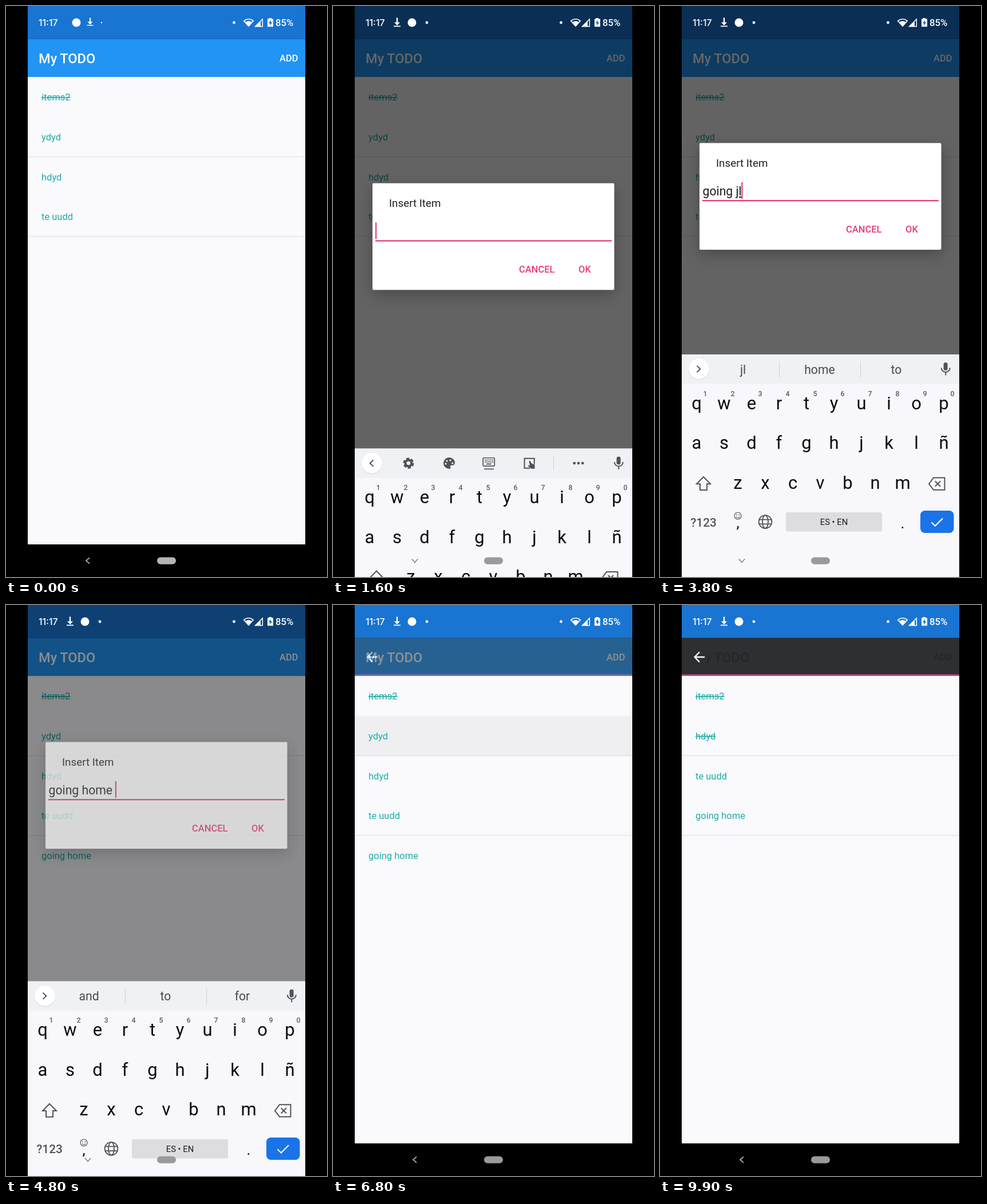
Write an HTML page that moves like this. It is 561x998 px and loops after 10000 ms.

```html
<!DOCTYPE html>
<html lang="en">
<head>
<meta charset="utf-8">
<title>Todo list</title>
<style>
  html, body { margin: 0; width: 100%; height: 100%; overflow: hidden; background: #000; }
  svg { display: block; width: 100vw; height: 100vh; }
  text { font-family: Roboto, "Noto Sans", sans-serif; white-space: pre; }
  .med { font-weight: 500; }
  .mid { text-anchor: middle; }
  .line { fill: none; stroke: #505357; stroke-width: 2; }
  .ink { fill: #505357; }
  .item { font-size: 16.5px; fill: #1eaca7; }
  .done { text-decoration: line-through; }
  .accent { fill: #e63c7a; }
  .key { font-size: 31px; fill: #0b0b0c; }
  .hint { font-size: 12.5px; fill: #5c5d61; }
  .word { font-size: 21.2px; fill: #484b4f; }
  #card { filter: drop-shadow(0 8px 12px rgba(0, 0, 0, .26)); }
  #composing { text-decoration: underline 1px; text-decoration-skip-ink: none; }
</style>
</head>
<body>
<svg id="stage" viewBox="0 0 561 998" xmlns="http://www.w3.org/2000/svg"></svg>
<script>
const DURATION = 10000, STEP = 100;
const CHAR_TIMES = [2600, 2700, 2900, 3000, 3100, 3300, 3500, 3700];
const PICK = 4200, SUBMIT = 4800, STRIKE = 7800, REMOVE = 9800;
const PRESSES = [{ down: 6200, act: STRIKE }, { down: 8700, act: REMOVE }];
const ROW_H = 69.75;

const rect = (x, y, w, h, fill, more = '') =>
  `<rect x="${x}" y="${y}" width="${w}" height="${h}" fill="${fill}" ${more}/>`;
const text = (x, y, str, cls = '', more = '') =>
  `<text x="${x}" y="${y}" class="${cls}" ${more}>${str}</text>`;
const circle = (x, y, r, more = '') => `<circle cx="${x}" cy="${y}" r="${r}" ${more}/>`;
const line = (d, more = '') => `<path d="${d}" class="line" ${more}/>`;

function appBar() {
  return rect(38, 0, 485, 57.5, '#1974d2') + rect(38, 57.5, 485, 66.5, '#2194f5') +
    text(57, 99.5, 'My TODO', 'med', 'font-size="23.6" fill="#fff"') +
    text(478, 97.3, 'ADD', 'med', 'font-size="16.5" fill="#fff"') +
    circle(494, 91, 0, 'id="addRipple" fill="#fff" clip-path="url(#barClip)"');
}

function actionBar() {
  return `<g id="actions">${rect(38, 57.5, 485, 64, '#2e2f31')}
    <g fill="#252628" clip-path="url(#ghostClip)">
      ${text(57, 99.5, 'My TODO', 'med', 'font-size="23.6"')}
      ${text(478, 97.3, 'ADD', 'med', 'font-size="16.5"')}</g>
    ${rect(38, 121.4, 485, 2.6, '#e4356f')}
    <path d="M78 91H61M69 82.3L60.6 91L69 99.7" fill="none" stroke="#fff" stroke-width="2.3"/></g>`;
}

function statusIcons() {
  return `<g fill="#fff">
    <text x="57" y="35" class="med" style="font-family:Inter,Roboto,sans-serif" font-size="15.8">11:17</text>
    <path id="download" d="M-1.2 -8H1.2V0H5L0 5.5L-5 0H-1.2ZM-6 6H6V7.8H-6Z"/>
    ${circle(138, 29, 7.5, 'id="badge"')}${circle(164, 29, 2.3, 'id="more"')}
    ${circle(398.5, 29, 2.4)}
    <path d="M415.8 26Q424 19.5 432.2 26L424 35.3Z" fill="none" stroke="#fff" stroke-width="1.6"/>
    <path d="M418.5 28Q424 24.5 429.5 28L424 35Z"/>
    <path d="M435.5 35.8L448.3 23V35.8Z" fill="none" stroke="#fff" stroke-width="1.5"/>
    <path d="M435.5 36L445 26.5V36Z"/>
    <path d="M459.5 21H464V22.6H467V36.3H457V22.6H459.5Z"/>
    <path d="M462.8 24.5L459 30.3H461.4V34.5L465.2 28.5H462.8Z" fill="#1768bd"/>
    ${text(471, 35, '85%', 'med', 'font-size="16.8"')}</g>`;
}

function dialog() {
  return `<g id="dialog">
    ${rect(69, 406, 422.5, 186.5, '#fff', 'rx="2" id="card"')}
    ${text(98, 447.5, 'Insert Item', '', 'font-size="18.8" fill="#1f1f21"')}
    <text id="field" x="74.5" y="497.5" font-size="21.2" fill="#1f1f21"><tspan id="before"></tspan><tspan id="composing"></tspan></text>
    ${rect(142, 474.5, 2.2, 29, '#e63c7a', 'id="caret"')}
    ${rect(74, 506, 413, 1, '#77757a', 'id="underline"')}
    ${text(325, 562.7, 'CANCEL', 'med accent', 'font-size="16.5"')}
    ${text(429, 562.7, 'OK', 'med accent', 'font-size="16.5"')}</g>`;
}

function toolIcons() {
  const dots = [[-4, -4], [2, -5], [6, 0], [-6, 1]]
    .map(([x, y]) => circle(203 + x, 634.5 + y, 1.6, 'fill="#eff1f4"')).join('');
  let keys = '';
  for (let i = 0; i < 10; i++)
    keys += rect(265.2 + (i % 5) * 3.2, 628 + Math.floor(i / 5) * 3.4, 1.9, 1.9, '#505357');
  return `<g id="tools">
    ${circle(132, 634.5, 5.4, 'class="line" style="stroke-width:4.2"')}
    ${circle(132, 634.5, 8.2, 'class="line" stroke-dasharray="5.4 3.19" style="stroke-width:2.8"')}
    <path class="ink" d="M203 624.5a10 10 0 1 0 0 20q2.6 0 2.3-2.6q-1.2-3.6 2-3.8h2.5q3.2-.6 3.2-4.6a10 9.4 0 0 0-10-9Z"/>${dots}
    ${line('M263.5 625.2H281Q282.3 625.2 282.3 626.5V638.3Q282.3 639.6 281 639.6H263.5Q262.2 639.6 262.2 638.3V626.5Q262.2 625.2 263.5 625.2Z', 'style="stroke-width:1.7"')}
    ${keys}${rect(268, 635, 8.5, 1.9, '#505357')}${rect(264, 644, 17, 1.7, '#505357')}
    ${line('M351.8 636V626.2H334.6V643.2H344')}
    <path class="ink" d="M342.5 631L344.5 630.5L347 635L352.6 637V644.3H346L340.5 639L341.5 638L344 638.6Z"/>
    ${rect(385, 622, 1, 25, '#cdd0d4')}
    ${[421.8, 429, 436.2].map(x => circle(x, 634.5, 2.4, 'class="ink"')).join('')}</g>`;
}

function letterKeys() {
  const rows = [['qwertyuiop', 64, 704.5], ['asdfghjklñ', 64, 774], ['zxcvbnm', 136, 843.5]];
  return rows.map(([chars, x, y]) => [...chars].map((c, i) =>
    text(x + i * 48, y, c, 'key mid')).join('')).join('') +
    [...'1234567890'].map((c, i) => text(79 + i * 48, 681.6, c, 'hint mid med')).join('');
}

function keyboard() {
  const words = [145, 279, 413].map((x, i) => text(x, 642.5, '', 'word mid', `id="word${i}"`)).join('');
  return `<g id="keyboard">
    ${rect(38, 609, 485, 390, '#f8f7fc')}${rect(38, 609, 485, 51, '#eff1f4')}
    ${circle(68, 635.3, 18, 'fill="#d3d6da"')}${circle(68, 634.5, 17.8, 'fill="#fff"')}
    ${line('M3 -5.6L-2.8 0L3 5.6', 'id="toggle"')}
    ${toolIcons()}
    <g id="words">${words}${rect(208, 621, 1, 28, '#cdd0d4')}${rect(350, 621, 1, 28, '#cdd0d4')}</g>
    ${rect(495.6, 623, 7, 14, '#505357', 'rx="3.5"')}
    ${line('M491.8 632.5a7.5 7.5 0 0 0 15 0M499.3 640V645.5')}
    ${letterKeys()}
    ${line('M76 823L88 835.3H82V846H70V835.3H64Z')}
    ${line('M478 824.5H497.5V845.8H478L470 835.2ZM480.8 830.5L490 839.8M490 830.5L480.8 839.8')}
    ${text(76, 909.6, '?123', 'mid med ink', 'font-size="20.8"')}
    ${circle(136, 891, 6, 'class="line" style="stroke-width:1.2"')}
    ${circle(133.9, 889.4, .9, 'class="ink"')}${circle(138.1, 889.4, .9, 'class="ink"')}
    ${line('M132.8 892.6Q136 896.3 139.2 892.6', 'style="stroke-width:1.1"')}
    ${text(136, 912, ',', 'mid', 'font-size="26" fill="#0b0b0c"')}
    <g class="line" style="stroke-width:1.8">${circle(184, 901.5, 11.4)}
      <ellipse cx="184" cy="901.5" rx="5" ry="11.4"/><path d="M173.3 897.6H194.7M173.3 905.4H194.7"/></g>
    ${rect(220, 885, 168, 33.5, '#dddce0', 'rx="3"')}
    ${text(304, 907.3, 'ES • EN', 'mid', 'font-size="14.8" fill="#1c1c1e"')}
    ${text(424, 912.5, '.', 'mid', 'font-size="26" fill="#0b0b0c"')}
    ${rect(455, 882, 58.5, 39, '#1a73e8', 'rx="8"')}
    <path d="M474.5 902.5L480.8 908.7L494 895.5" fill="none" stroke="#fff" stroke-width="2.2"/></g>`;
}

document.getElementById('stage').innerHTML = `
  <defs>
    <clipPath id="phone">${rect(38, 0, 485, 998, '#000')}</clipPath>
    <clipPath id="barClip">${rect(38, 57.5, 485, 66.5, '#000')}</clipPath>
    <clipPath id="ghostClip">${rect(82, 57, 441, 67, '#000')}</clipPath>
    <clipPath id="rowClip">${rect(38, 194, 485, 69, '#000')}</clipPath>
  </defs>
  ${rect(0, 0, 561, 998, '#000')}
  <g clip-path="url(#phone)">
    ${rect(38, 124, 485, 817, '#faf9fc')}
    ${rect(38, 262.8, 485, 1.2, '#e1e0e3')}${rect(38, 402.2, 485, 1.2, '#e1e0e3')}
    ${circle(280, 229, 0, 'id="rowRipple" fill="#000" clip-path="url(#rowClip)"')}
    <g id="list"></g>
    ${appBar()}${actionBar()}
    ${rect(38, 0, 485, 941, '#000', 'id="dim"')}
    ${statusIcons()}${dialog()}${keyboard()}
    <path id="back" d="M3 -5.2L-3 0L3 5.2" fill="none" stroke-width="1.7"/>
    ${rect(264, 963.5, 33, 12.3, '#999', 'rx="6.1" id="pill"')}
  </g>`;

const ui = {};
document.querySelectorAll('[id]').forEach(e => ui[e.id] = e);
const set = (e, attrs) => { for (const k in attrs) e.setAttribute(k, attrs[k]); };
const ramp = (t, a, b) => Math.min(1, Math.max(0, (t - a) / (b - a)));
const easeOut = p => 1 - (1 - p) ** 3;
const show = (e, on) => set(e, { visibility: on ? 'inherit' : 'hidden' });

function suggestions(typed) {
  if (typed.length > 8) return ['and', 'to', 'for'];
  const word = typed.split(' ').pop();
  if (!word) return ['to', 'home', 'out'];
  if (word === 'j') return ['j', 'just', 'to'];
  return word === 'jl' ? ['jl', 'home', 'to'] : [word, 'going', 'good'];
}

function drawList(t) {
  const names = ['items2', 'ydyd', 'hdyd', 'te uudd'];
  if (t >= SUBMIT) names.push('going home');
  if (t >= REMOVE) names.splice(1, 1);
  // the second row keeps its strike after a removal
  ui.list.innerHTML = names.map((name, i) => {
    const done = i === 0 || (i === 1 && t >= STRIKE);
    return text(62, 165 + i * ROW_H, name, 'item' + (done ? ' done' : ''));
  }).join('');
}

function drawDialog(t) {
  const rise = easeOut(ramp(t, 1500, 1900));
  const alpha = ramp(t, 300, 600) * (1 - ramp(t, 4700, 5000));
  const focused = t >= 1500;
  const typed = t >= PICK ? 'going home ' : 'going jl'.slice(0, CHAR_TIMES.filter(c => c <= t).length);
  const start = t >= PICK ? typed.length : typed.lastIndexOf(' ') + 1;
  set(ui.dim, { opacity: .6 * ramp(t, 300, 600) * (1 - ramp(t, 4700, 5100)) });
  set(ui.dialog, { opacity: alpha, transform: `translate(0 ${-166.5 * rise})` });
  show(ui.dialog, alpha > 0);
  set(ui.underline, focused ? { y: 505.6, height: 2.2, fill: '#e0396f' } : { y: 506, height: 1, fill: '#77757a' });
  ui.before.textContent = typed.slice(0, start);
  ui.composing.textContent = typed.slice(start);
  set(ui.caret, { x: 74 + (typed ? ui.field.getComputedTextLength() : 0) });
  show(ui.caret, focused && (t < 2100 || t >= 2600) && alpha > 0);

  const up = rise * (1 - ramp(t, 4700, 5100) ** 1.5);
  set(ui.keyboard, { transform: `translate(0 ${390 * (1 - up)})` });
  show(ui.keyboard, up > 0);
  show(ui.tools, !typed && up > 0);
  show(ui.words, !!typed && up > 0);
  set(ui.toggle, { transform: `translate(67.5 634.5) scale(${typed ? -1 : 1} 1)` });
  if (typed) suggestions(typed).forEach((w, i) => ui['word' + i].textContent = w);
  set(ui.back, {
    transform: `translate(143 969.5) rotate(${up > .5 ? -90 : 0})`,
    stroke: up > .5 ? '#88878b' : '#b4b4b4'
  });
}

function drawPresses(t) {
  let bar = 0, r = 0, tint = 0;
  for (const { down, act } of PRESSES) {
    if (t <= down || t >= act + 400) continue;
    bar = ramp(t, down + 400, down + 800) * (1 - ramp(t, act + 100, act + 400));
    r = 300 * ramp(t, down, down + 300);
    tint = .09 * (1 - ramp(t, down + 400, down + 800));
  }
  set(ui.actions, { opacity: bar });
  set(ui.rowRipple, { r, opacity: tint });
  set(ui.addRipple, { r: 40 * ramp(t, 0, 300), opacity: .22 * (1 - ramp(t, 300, 600)) });
}

function drawStatus(t) {
  const early = t < 200;
  set(ui.download, { transform: early ? 'translate(147 27.6) scale(.9)' : 'translate(112 28.5)' });
  set(ui.badge, { cx: early ? 123 : 138 });
  set(ui.more, early ? { cx: 167, r: 1.2 } : { cx: 164, r: 2.4 });
  set(ui.pill, { fill: early ? '#b4b4b4' : '#9a999b' });
}

function draw(t) {
  drawList(t);
  drawDialog(t);
  drawPresses(t);
  drawStatus(t);
}

const begin = performance.now();
let last = -1;
function tick() {
  const t = Math.floor(((performance.now() - begin) % DURATION) / STEP) * STEP;
  if (t !== last) draw(last = t);
  requestAnimationFrame(tick);
}
tick();
</script>
</body>
</html>
```
